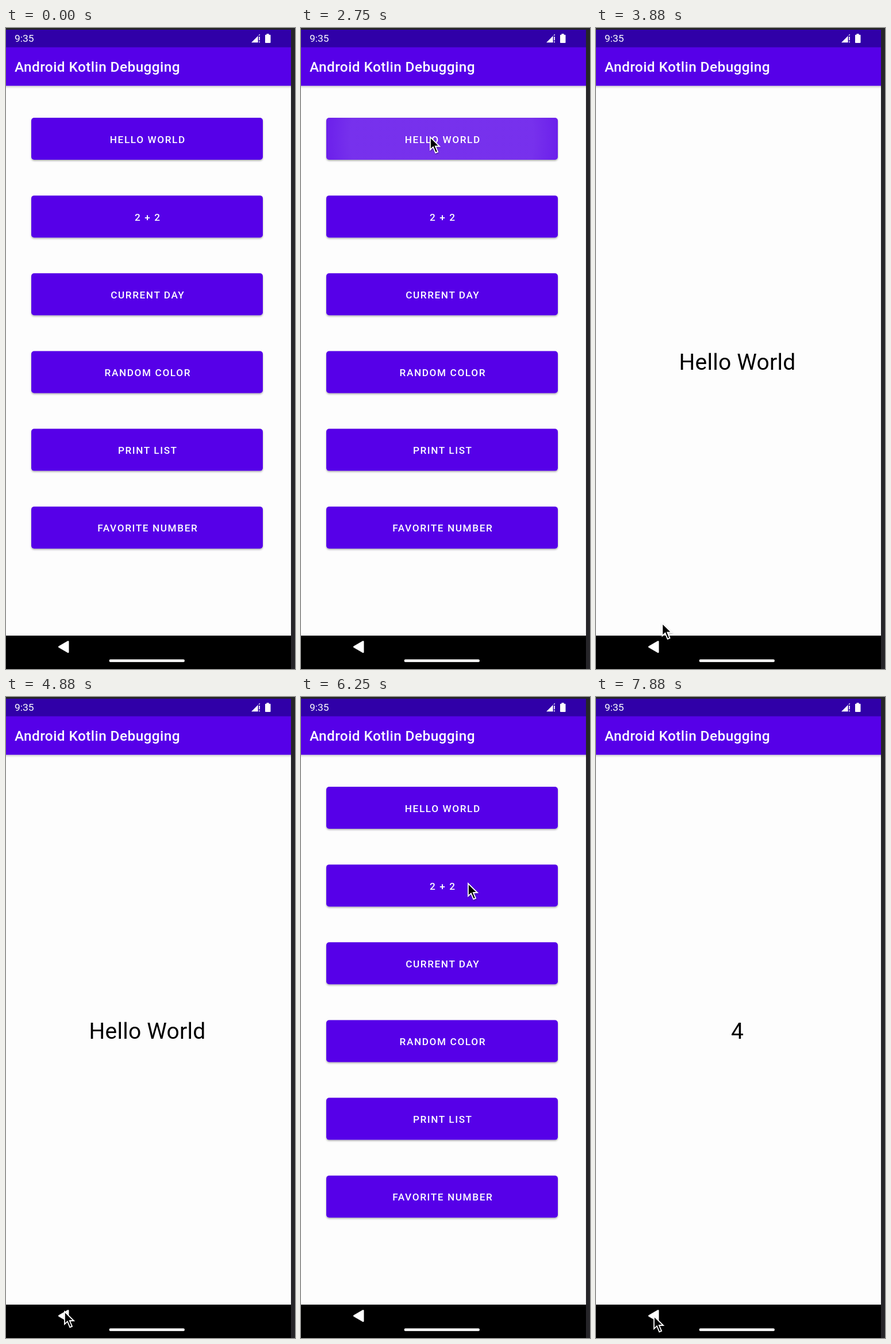
Animation of 503x1114 px, one loop 8000 ms. Source, as an HTML page:

```html
<!DOCTYPE html>
<html lang="en">
<head>
<meta charset="utf-8">
<title>App walkthrough</title>
<style>
  html, body { margin: 0; width: 100%; height: 100%; overflow: hidden; background: #262529; }
  svg { display: block; width: 503px; height: 1114px; }
  text { font-family: Roboto, "Liberation Sans", sans-serif; }
  .bar { fill: #5600e8; }
  .title { font-size: 24.4px; font-weight: 500; letter-spacing: .42px; fill: #fff; }
  .label { font-size: 17.2px; font-weight: 500; letter-spacing: 1.6px; fill: #fff; text-anchor: middle; }
  .result { font-size: 39px; letter-spacing: .25px; fill: #000; text-anchor: middle; }
  .clock { font-size: 17.4px; fill: #fff; }
</style>
</head>
<body>
<svg viewBox="0 0 503 1114">
  <defs>
    <filter id="soft" x="-10%" y="-30%" width="120%" height="160%">
      <feDropShadow dx="0" dy="1.8" stdDeviation="1.6" flood-color="#000" flood-opacity=".32"/>
    </filter>
    <filter id="drop" x="-40%" y="-30%" width="200%" height="180%">
      <feDropShadow dx=".5" dy="1.5" stdDeviation="1.3" flood-color="#000" flood-opacity=".35"/>
    </filter>
    <linearGradient id="under" x2="0" y2="1">
      <stop stop-color="#000" stop-opacity=".16"/>
      <stop offset="1" stop-color="#000" stop-opacity="0"/>
    </linearGradient>
    <radialGradient id="wave">
      <stop offset=".78" stop-color="#fff" stop-opacity=".08"/>
      <stop offset="1" stop-color="#fff" stop-opacity="0"/>
    </radialGradient>
    <clipPath id="press"><rect x="44" y="156" width="403" height="73" rx="5"/></clipPath>
  </defs>

  <g id="list"></g>
  <g id="detail"></g>

  <rect y="3" width="496" height="30.5" fill="#3000a8"/>
  <text class="clock" x="15" y="24">9:35</text>
  <path d="M427 25.2 441.8 10.4V13H438.6V25.2ZM440.2 15H441.9V21.4H440.2ZM440.2 23.2H441.9V25.2H440.2Z" fill="#fff"/>
  <path d="M453.5 10h4v1.7h2.1q.9 0 .9.9v12.5q0 .9-.9.9h-7.7q-.9 0-.9-.9v-12.5q0-.9.9-.9h1.6z" fill="#fff"/>

  <rect y="1056" width="496" height="58" fill="#000"/>
  <path d="M92.5 1075.5 108 1066.5V1084.5Z" fill="#fff" stroke="#fff" stroke-width="3" stroke-linejoin="round"/>
  <rect x="179.5" y="1097.3" width="131.5" height="4.8" rx="2.4" fill="#f2f2f2"/>

  <path d="M0 0H503V1114H496V3H0Z" fill="#262529"/>

  <g id="cursor">
    <path d="M.9 2.2V24L6 19.2 10.2 29.3 14 27.7 9.8 18H17Z" fill="#000" stroke="#fff"
      stroke-width="1.8" filter="url(#drop)"/>
  </g>
</svg>
<script>
const LOOP = 8000, STEP = 125;
const LABELS = ["HELLO WORLD", "2 + 2", "CURRENT DAY", "RANDOM COLOR", "PRINT LIST", "FAVORITE NUMBER"];
const PITCH = 135.15;

// time, x, y of the pointer tip
const PATH = [
  [625, 478, 1062], [1125, 304, 150], [1375, 304, 150], [2000, 224, 187.5],
  [3125, 224, 187.5], [4000, 108, 1082], [4375, 101, 1066], [5375, 101, 1066],
  [6250, 290, 322], [7125, 290, 322], [7875, 100, 1074]
];
const PRESSES = [{ at: 2500, row: 0, x: 224 }, { at: 6500, row: 1, x: 290 }];
// time since the press, share of the full wave, strength
const WAVE = [[125, .55, .8], [250, 1, 1], [375, 1.15, .8]];
// time, left offset of the incoming screen
const OPEN = [[0, 8], [125, 1.6], [250, 0]];

const $ = id => document.getElementById(id);
const list = $("list"), detail = $("detail"), cursor = $("cursor");

const page = body => `
  <rect x="-60" y="33" width="620" height="1024" fill="#fdfdfd"/>
  <rect class="bar" x="-60" y="33" width="620" height="67.5"/>
  <rect x="-60" y="100.5" width="620" height="5" fill="url(#under)"/>
  <text class="title" x="15" y="76.3">Android Kotlin Debugging</text>${body}`;

const rowY = i => (i * PITCH).toFixed(2);
list.innerHTML = page(
  LABELS.map((s, i) => `<rect class="bar" x="44" y="156" width="403" height="73" rx="5"
    transform="translate(0 ${rowY(i)})" filter="url(#soft)"/>`).join("") +
  `<g id="ripple"><g clip-path="url(#press)">
    <rect x="44" y="156" width="403" height="73" fill="#fff" opacity=".12"/>
    <circle id="ring" cy="192.5" fill="url(#wave)"/></g></g>` +
  LABELS.map((s, i) => `<text class="label" x="246.8" y="${199.5 + i * PITCH}">${s}</text>`).join(""));
detail.innerHTML = page(`<text class="result" id="result" x="246" y="594"></text>`);

const ripple = $("ripple"), ring = $("ring"), result = $("result");

const show = (el, on) => el.setAttribute("visibility", on ? "visible" : "hidden");
const move = (el, x, y = 0) => el.setAttribute("transform", `translate(${x} ${y})`);
const last = (rows, t) => rows.filter(r => r[0] <= t).pop();
const offset = t => last(OPEN, t)[1];

function pointer(t) {
  const i = PATH.findIndex(p => p[0] > t);
  if (i < 0) return PATH[PATH.length - 1].slice(1);
  const [t0, x0, y0] = PATH[i - 1], [t1, x1, y1] = PATH[i];
  const u = (t - t0) / (t1 - t0), k = u * u * (3 - 2 * u);
  return [x0 + (x1 - x0) * k, y0 + (y1 - y0) * k];
}

function drawRipple(t) {
  const press = PRESSES.find(p => t >= p.at + 125 && t < p.at + 500);
  show(ripple, press);
  if (!press) return;
  const [, size, power] = last(WAVE, t - press.at);
  move(ripple, 0, rowY(press.row));
  ripple.setAttribute("opacity", power);
  ring.setAttribute("cx", press.x + (245.5 - press.x) * Math.min(1, size));
  ring.setAttribute("r", 205 * size);
}

function draw(t) {
  const first = t >= 3000 && t < 5125, second = t >= 7000;
  const opened = first || second;
  show(detail, opened);
  show(list, !opened);
  if (opened) {
    result.textContent = first ? "Hello World" : "4";
    move(detail, offset(t - (first ? 3000 : 7000)));
  } else {
    move(list, t >= 5125 ? -offset(t - 5125) : 0);
  }
  if (opened) show(ripple, false);
  else drawRipple(t);
  show(cursor, t >= PATH[0][0]);
  if (t >= PATH[0][0]) move(cursor, ...pointer(t));
}

function frame() {
  draw(Math.floor(performance.now() % LOOP / STEP) * STEP);
  requestAnimationFrame(frame);
}
frame();
</script>
</body>
</html>
```
